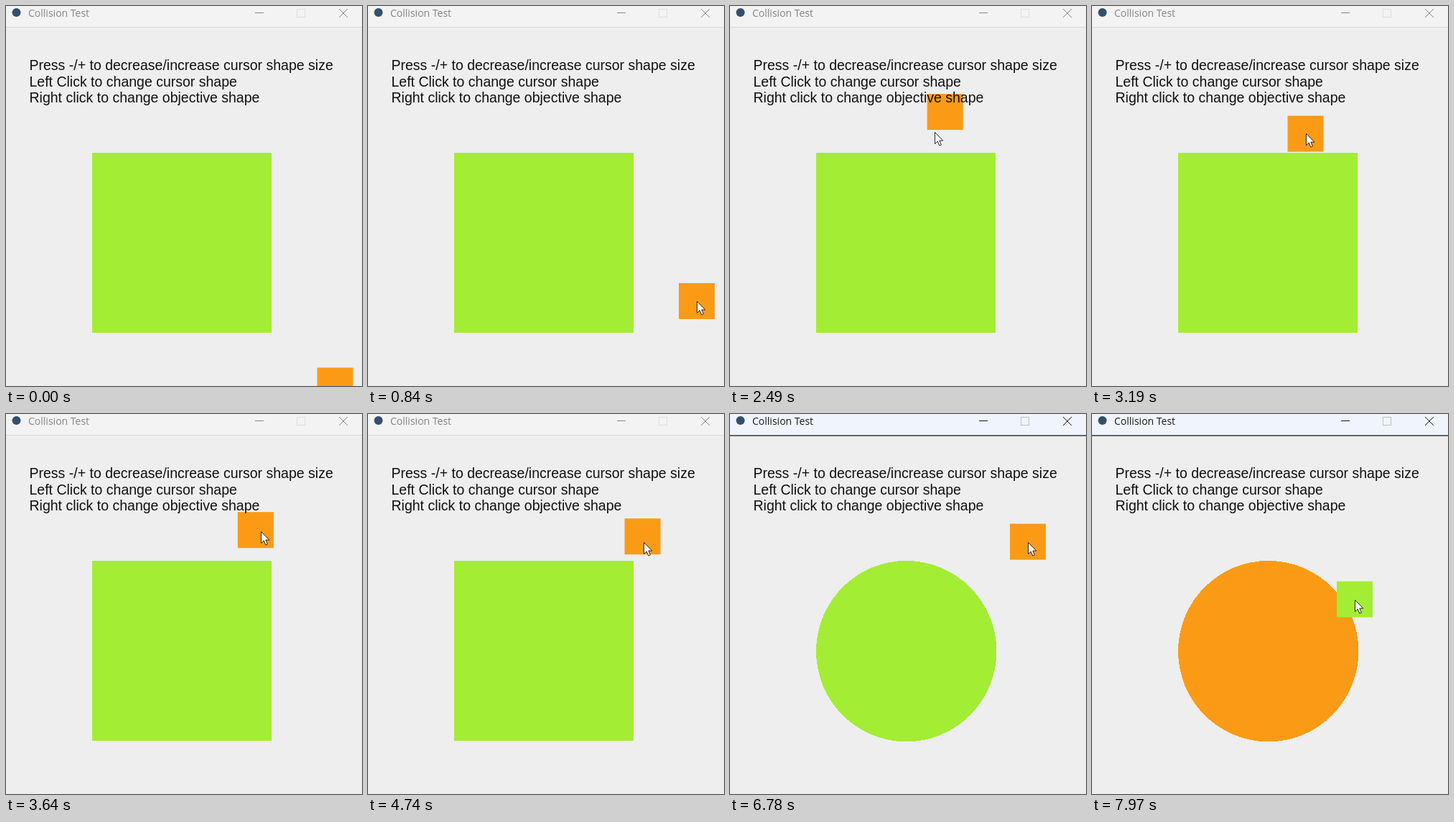
Recreate the animation shown at these times as an HTML page. Size 496 px wide and 528 px high, loop 8000 ms.

```html
<!DOCTYPE html>
<html lang="en">
<head>
<meta charset="utf-8">
<title>Collision Test</title>
<style>
  html, body { margin: 0; width: 100%; height: 100%; overflow: hidden; background: #eee; }
  svg { display: block; }
  .title { font: 14px "Open Sans", "Noto Sans", sans-serif; }
  .help { font: 19.5px "Liberation Sans", Arial, sans-serif; fill: #111; }
  .idle { color: #858585; --bar: #f3f3f3; --line: #dadada; --off: #dedede; }
  .active { color: #1a1a1a; --bar: #f0f4fc; --line: #62636b; --off: #bfc3b8; }
</style>
</head>
<body>
<svg width="496" height="528" viewBox="0 0 496 528">
  <defs>
    <g id="bar" fill="none">
      <rect width="496" height="29" style="fill: var(--bar)"/>
      <text class="title" x="31" y="15" fill="currentColor">Collision Test</text>
      <rect x="405.5" y="4.5" width="11" height="11" style="stroke: var(--off)"/>
      <path d="M347 9.5h12M464 4l12 12M476 4l-12 12" stroke="currentColor"/>
      <path d="M0 29.5h496" style="stroke: var(--line)"/>
    </g>
  </defs>
  <rect width="496" height="528" fill="#eee"/>
  <use href="#bar" class="idle"/>
  <g class="active" id="active">
    <use href="#bar"/>
    <path d="M0 30.5h496" style="stroke: var(--line)"/>
  </g>
  <circle cx="14.5" cy="9" r="6" fill="#34506c"/>
  <rect id="box" x="120" y="204" width="250" height="250"/>
  <circle id="disc" cx="245.7" cy="329.6" r="125.7" shape-rendering="crispEdges"/>
  <rect id="small" width="50" height="50"/>
  <g class="help">
    <text x="32.5" y="89">Press -/+ to decrease/increase cursor shape size</text>
    <text x="32.5" y="111.5">Left Click to change cursor shape</text>
    <text x="32.5" y="134">Right click to change objective shape</text>
  </g>
  <path id="cursor" d="M.5 .5v16l3.7-3.5 2.6 6 2.6-1.1-2.6-5.8h5z" fill="#fff" stroke="#111" stroke-width=".9"/>
</svg>
<script>
const LOOP = 8000, LAG = 50, CLICK = 6540, SIZE = 50;
const GREEN = '#a3ed34', ORANGE = '#fb9b15';
const START = [433.5, 502.5];

// mouse strokes: begin, end, where the small square arrives
const strokes = [
  [140, 580, 432, 405], [740, 840, 433, 385],
  [1140, 1670, 367.5, 269], [1670, 1920, 340, 266],
  [1920, 2490, 275, 121.5], [2490, 2640, 248, 172], [2640, 2780, 262, 200],
  [2780, 3190, 272.5, 152.5], [3240, 3570, 318, 135], [3610, 4100, 357.5, 145],
  [4740, 4950, 361, 164], [4950, 5410, 390, 152.5],
  [7470, 7970, 341, 232.5]
];

const $ = id => document.getElementById(id);
const clamp = (v, lo, hi) => Math.min(hi, Math.max(lo, v));

function set(id, attrs) {
  for (const name in attrs) $(id).setAttribute(name, attrs[name]);
}

// each stroke slows down towards its end
function place(t) {
  let [x, y] = START;
  for (const [begin, end, toX, toY] of strokes) {
    const u = clamp((t - begin) / (end - begin), 0, 1), k = u * (2 - u);
    x += (toX - x) * k;
    y += (toY - y) * k;
  }
  return [x, y];
}

function hits(x, y, round) {
  if (!round) return x < 370 && x + SIZE > 120 && y < 454 && y + SIZE > 204;
  const cx = 245.7, cy = 329.6;
  return Math.hypot(clamp(cx, x, x + SIZE) - cx, clamp(cy, y, y + SIZE) - cy) < 125.7;
}

function draw(now) {
  const t = now % LOOP, [x, y] = place(t);
  // the square trails behind the pointer
  const [px, py] = place(t + LAG).map(v => Math.round(v + SIZE / 2));
  const round = t >= CLICK + 30, hit = hits(x, y, round);
  const goal = hit ? ORANGE : GREEN;
  set('small', { x, y, fill: hit ? GREEN : ORANGE });
  set('box', { fill: round ? 'none' : goal });
  set('disc', { fill: round ? goal : 'none' });
  set('cursor', { transform: `translate(${px} ${py})` });
  set('active', { opacity: clamp((t - CLICK) / 240, 0, 1) });
  requestAnimationFrame(draw);
}
requestAnimationFrame(draw);
</script>
</body>
</html>
```
